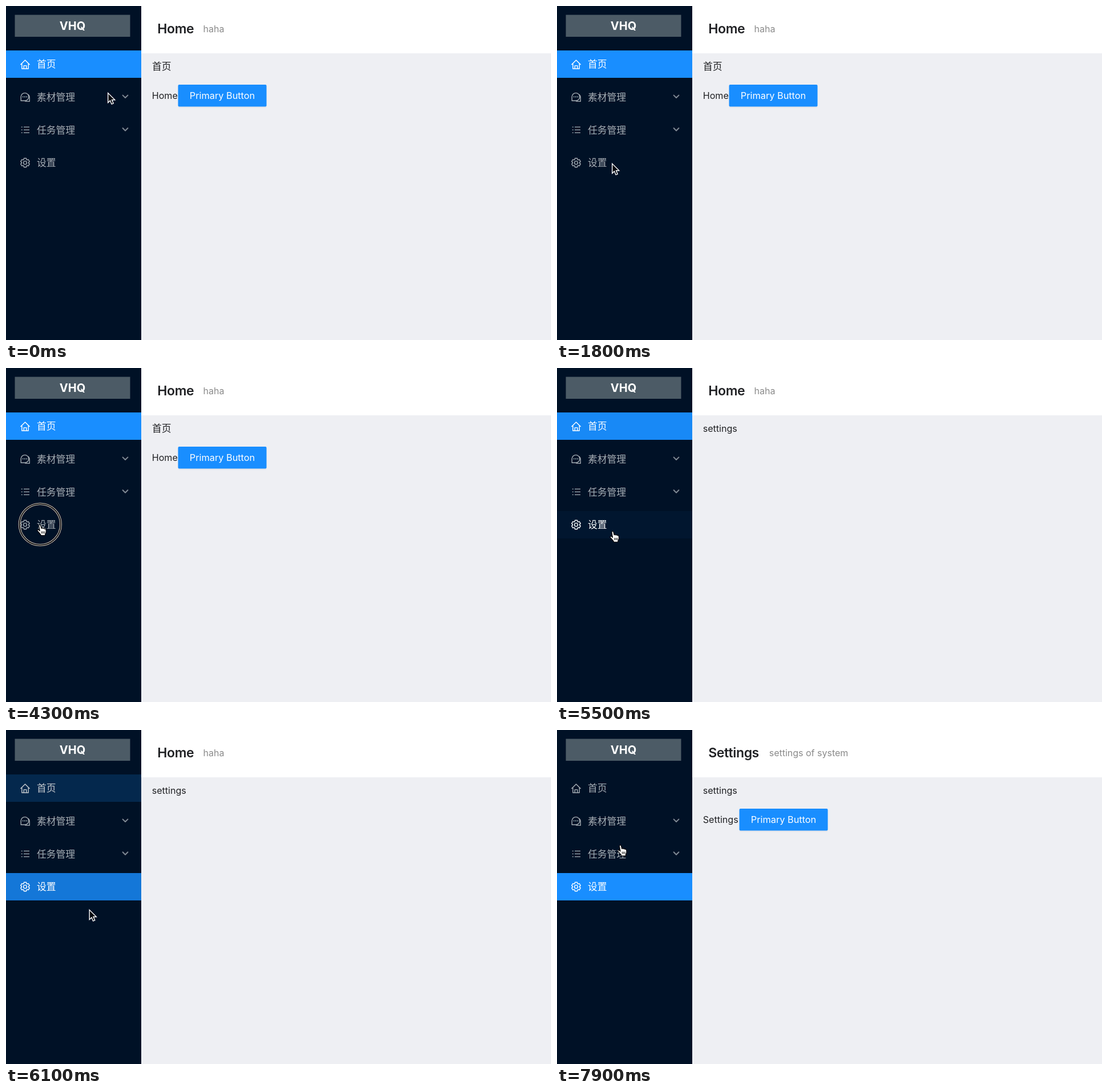
An HTML page that plays this animation: 955x586 px, repeating every 8000 ms.

```html
<!DOCTYPE html>
<html lang="zh">
<head>
<meta charset="utf-8">
<title>Admin menu</title>
<style>
  html, body { margin: 0; width: 100%; height: 100%; overflow: hidden; background: #eeeff3; }
  svg { display: block; width: 955px; height: 586px; font: 16.1px Inter, "Noto Sans CJK SC", sans-serif; fill: #202124; }
  .cjk { font: 16.8px "Noto Sans CJK SC", "Noto Sans CJK", sans-serif; }
  .logo { font-weight: 700; font-size: 20px; fill: #fff; text-anchor: middle; }
  .title { font-weight: 600; font-size: 23px; letter-spacing: -.4px; }
  .sub { font-size: 16px; fill: #8a8a8a; }
  .item { color: #a6adb4; }
  .item text { fill: currentColor; }
  .icon { fill: none; stroke: currentColor; stroke-width: 1.4; stroke-linejoin: round; }
  .dot { fill: currentColor; stroke: none; }
  .chevron { fill: none; stroke: #7f8994; stroke-width: 2; stroke-linecap: round; stroke-linejoin: round; }
  .button { fill: #198eff; }
  .button + text { fill: #fff; font-size: 16.3px; text-anchor: middle; }
</style>
</head>
<body>
<svg viewBox="0 0 955 586">
  <defs>
    <g id="button">
      <rect y="140" width="155" height="38.5" rx="2" fill="#000" opacity=".045"/>
      <rect class="button" y="138" width="155" height="38.5" rx="2"/>
      <text x="77.5" y="163.3">Primary Button</text>
    </g>
  </defs>

  <rect width="955" height="586" fill="#eeeff3"/>
  <rect x="237" width="718" height="83" fill="#fff"/>
  <rect width="237" height="586" fill="#001126"/>
  <rect x="15.5" y="15.5" width="202" height="38.5" fill="#4c5b66"/>
  <text class="logo" x="116.5" y="42.2">VHQ</text>

  <rect id="homeBg" y="78" width="237" height="48" fill="#198eff"/>
  <rect id="setBg" y="251" width="237" height="48" fill="#198eff"/>

  <g class="item" id="homeItem">
    <path class="icon" d="M25.4 103 33.5 94.9 41.6 103M27.8 101.2V110H39.2V101.2M31.3 110V104.6H35.7V110"/>
    <text class="cjk" x="54" y="108.4">首页</text>
  </g>
  <g class="item">
    <path class="icon" d="M26.2 166.2V159.3A6.8 6.8 0 1 1 33 166.2ZM38.8 155.4A5.6 5.6 0 0 1 41.2 160.2V167.4H36A6 6 0 0 1 32.6 166.4"/>
    <path class="dot" d="M28.8 158.4h1.8v1.8h-1.8zM32.1 158.4h1.8v1.8h-1.8zM35.4 158.4h1.8v1.8h-1.8z"/>
    <text class="cjk" x="54" y="166.1">素材管理</text>
    <path class="chevron" d="M204.6 156.6 209 161 213.4 156.6"/>
  </g>
  <g class="item">
    <path class="icon" d="M31 212.4H41M31 217.4H41M31 222.4H41M26.8 212.4h2M26.8 217.4h2M26.8 222.4h2"/>
    <text class="cjk" x="54" y="223.7">任务管理</text>
    <path class="chevron" d="M204.6 214.3 209 218.7 213.4 214.3"/>
  </g>
  <g class="item" id="setItem">
    <path class="icon" id="gear"/>
    <circle class="icon" cx="33.5" cy="275" r="2.9"/>
    <text class="cjk" x="54" y="281.4">设置</text>
  </g>

  <g id="homeHead">
    <text class="title" x="265.3" y="48.2">Home</text>
    <text class="sub" x="345.5" y="45.6">haha</text>
  </g>
  <g id="setHead">
    <text class="title" x="265.3" y="48.2">Settings</text>
    <text class="sub" x="371.7" y="45.6">settings of system</text>
    <text x="255.7" y="163.3">Settings</text>
    <use href="#button" x="319.5"/>
  </g>
  <g id="homeBody">
    <text class="cjk" x="256" y="111.9">首页</text>
    <text x="255.7" y="163.3">Home</text>
    <use href="#button" x="301.5"/>
  </g>
  <text id="setBody" x="255.7" y="111.6">settings</text>

  <g id="ring" fill="none">
    <circle stroke="#d9cbb9" stroke-width="3.8"/>
    <circle stroke="#05080f" stroke-width="1.8"/>
  </g>
  <g id="arrow">
    <path d="M.7 1.6V18.6L4.5 15 7.1 21.2 10.2 19.9 7.6 13.8H12.8Z" fill="#05080f" stroke="#fff" stroke-width="1.4"/>
  </g>
  <g id="hand">
    <path transform="translate(-5.5)" fill="#fff" stroke="#000" stroke-width="1.1" stroke-linejoin="round"
      d="M3.5 2.4C3.3 .2 6 -.1 6.5 2L7.7 7C8 5.8 10 5.9 10.3 7.3 10.8 6.3 12.6 6.6 12.9 8 13.5 7.3 15.5 7.8 15.8 9.6 16.3 12.4 16 14.2 14.6 16.4L14.2 19.3H7L6.4 17.6C4.6 15.8 3.6 13.8 1.2 11.6 -.2 9.8 1.6 8.4 3.2 9.8L5 11.4Z"/>
    <path transform="translate(-5.5)" fill="none" stroke="#000" stroke-width="1" d="M8.3 12V16M10.6 12V16M12.9 12V16"/>
  </g>
</svg>
<script>
  const LOOP = 8000, STEP = 100;
  const $ = id => document.getElementById(id);

  // cursor stops: time, x, y
  const path = [
    [0, 178, 151], [400, 178, 151], [1300, 121, 252], [1800, 96, 275],
    [2100, 96, 275], [2500, 72, 275], [2600, 72, 275], [2700, 73, 277.5],
    [4200, 73, 277.5], [4300, 59.8, 274.5], [4800, 59.8, 274.5],
    [5500, 98, 286], [5700, 134, 314], [5900, 148.5, 326], [6300, 142.5, 302],
    [6600, 129.5, 268], [6700, 132.5, 265], [7600, 132.5, 265],
    [7900, 111.5, 201.5], [LOOP, 111.5, 201.5]
  ];
  // pressed ring: start, settled, released, first radius
  const presses = [[3000, 3100, 3800, 27], [4300, 4600, 4900, 38]];
  const RADIUS = 28;

  const clamp = v => Math.min(1, Math.max(0, v));
  const span = (t, a, b) => clamp((t - a) / (b - a));
  const mix = (a, b, k) => a + (b - a) * k;
  const ease = p => p < .5 ? 4 * p ** 3 : 1 - 4 * (1 - p) ** 3;
  const within = (t, a, b) => t >= a && t < b;
  const show = (id, on) => $(id).setAttribute("visibility", on ? "visible" : "hidden");
  const tint = k => `rgb(${[166, 173, 180].map(c => Math.round(mix(c, 255, k)))})`;

  function cursorAt(t) {
    const i = path.findIndex(p => p[0] > t);
    const [a, b] = [path[i - 1], path[i]];
    const k = span(t, a[0], b[0]);
    return [mix(a[1], b[1], k), mix(a[2], b[2], k)];
  }

  function drawGear() {
    const pts = [];
    for (let k = 0; k < 6; k++) {
      for (const [r, deg] of [[6.1, -24], [8, -15], [8, 15], [6.1, 24]]) {
        const a = (k * 60 + deg - 90) * Math.PI / 180;
        pts.push((33.5 + r * Math.cos(a)).toFixed(2) + " " + (275 + r * Math.sin(a)).toFixed(2));
      }
    }
    $("gear").setAttribute("d", "M" + pts.join("L") + "Z");
  }

  function drawRing(t, x, y) {
    const press = presses.find(p => within(t, p[0], p[2] + STEP));
    show("ring", press);
    if (!press) return;
    const [start, settled, end, first] = press;
    const r = mix(first, RADIUS, span(t, start, settled)) - 1.8;
    $("ring").setAttribute("transform", `translate(${x} ${y})`);
    $("ring").setAttribute("opacity", t < end ? 1 : .5);
    for (const c of $("ring").children) c.setAttribute("r", r);
  }

  function render(t) {
    const [x, y] = cursorAt(t);
    const hand = within(t, 2700, 5600) || t >= 6500;
    show("hand", hand);
    show("arrow", !hand);
    $(hand ? "hand" : "arrow").setAttribute("transform", `translate(${x} ${y})`);
    drawRing(t, x, y);

    const k = ease(span(t, 5200, 6600));
    $("homeBg").setAttribute("opacity", 1 - k);
    $("setBg").setAttribute("opacity", k);
    $("homeItem").style.color = tint(1 - span(t, 5900, 6200));
    $("setItem").style.color = tint(span(t, 4900, 5200));

    show("homeBody", t < 5100);
    show("setBody", t >= 5100);
    show("homeHead", t < 6500);
    show("setHead", t >= 6500);
  }

  drawGear();
  const begin = performance.now();
  function tick() {
    const t = (performance.now() - begin) % LOOP;
    render(Math.floor(t / STEP) * STEP);
    requestAnimationFrame(tick);
  }
  tick();
</script>
</body>
</html>
```
